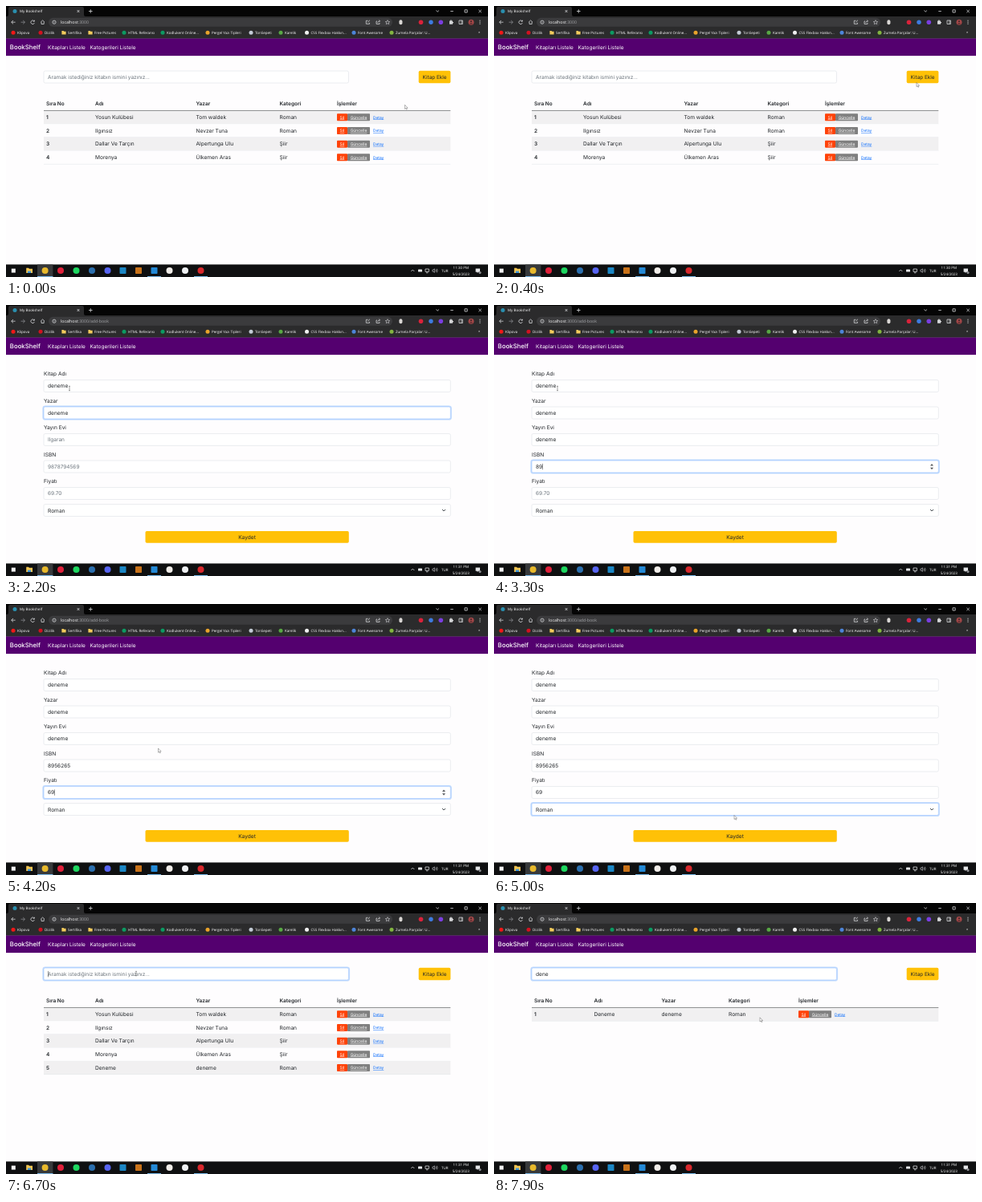
Write an HTML page that moves like this. It is 600 px wide and 338 px high and loops after 8 s.

```html
<!DOCTYPE html>
<html lang="tr">
<head>
<meta charset="utf-8">
<title>My Bookshelf</title>
<style>
  html, body { margin: 0; width: 100%; height: 100%; overflow: hidden; background: #fefdfe; }
  svg { display: block; width: 100%; height: 100%; }
  text { font: 6.6px Inter, "Open Sans", sans-serif; fill: #212529; text-rendering: geometricPrecision; white-space: pre; }
  .ui { font: 4.5px "Open Sans", "Noto Sans", sans-serif; fill: #fff; }
  .url { font-size: 5.2px; }
  .dim { fill: #a3a5a8; }
  .brand { font-size: 7.8px; fill: #fff; font-weight: 500; }
  .nav { font-size: 6.5px; fill: #fff; }
  .head { font-size: 6.5px; font-weight: 600; }
  .hint { font-size: 6.5px; fill: #6c757d; }
  .btn { font-size: 6.4px; }
  .tag, .link { text-decoration: underline; text-decoration-thickness: .3px; text-underline-offset: .6px; }
  .tag { font-size: 5px; fill: #fff; }
  .link { font-size: 4.85px; fill: #0d6efd; }
  .mid { text-anchor: middle; }
  .line { fill: none; stroke: #d5d6d8; stroke-width: .8; }
</style>
</head>
<body>
<svg viewBox="0 0 600 338" preserveAspectRatio="none">
  <g id="chrome"></g>
  <g id="page"></g>
  <g id="mouse"></g>
</svg>
<script>
const LOOP = 8000, STEP = 100;
const LIST_AGAIN = 5300, ROW_ADDED = 5500, FORM_OPEN = 600;
const FRAME = '#050505', TOOLBAR = '#2b2b2c', PILL = '#3b3b3d';

const rect = (x, y, w, h, fill, r = 0, more = '') =>
  `<rect x="${x}" y="${y}" width="${w}" height="${h}" fill="${fill}" rx="${r}" ${more}/>`;
const dot = (x, y, r, fill) => `<circle cx="${x}" cy="${y}" r="${r}" fill="${fill}"/>`;
const path = (d, more = 'class="line"') => `<path d="${d}" ${more}/>`;
// y is the middle of the line of text
const text = (x, y, s, cls = '', size = 6.5) =>
  `<text x="${x}" y="${y + size * .36}" class="${cls}">${s}</text>`;
const ui = (x, y, s, cls = '') => text(x, y, s, 'ui ' + cls, 4.5);

// ---- browser window and taskbar ----
const bookmarks = [
  [9, '#f01818', 'Klipova'], [43, '#d01220', 'Dizilik'],
  [72, 'folder', 'Sertifika'], [105, 'folder', 'Free Pictures'],
  [147, '#0c9a62', 'HTML Referansı'], [195, '#0c9a62', 'Kodlukent Online...'],
  [251, '#e9a32a', 'Pergel Yazı Tipleri'], [305, '#c3cbd6', 'TonSepeti'],
  [342, '#58a844', 'Karelik'], [374.5, '#f0f0f0', 'CSS Flexbox Hakkın...'],
  [433, '#4d84d8', 'Font Awesome'], [480, '#82b440', 'Zumela Parçalar: U...']
];

const taskIcons = [
  [68, '#e0203a'], [87.5, '#1ed760'], [107, '#2b6fae'], [126.5, '#5865f2'],
  [145.5, '#1b86c4', 1], [165, '#c9731a', 1], [184.5, '#2489d6', 1],
  [203.5, '#f0ece8'], [223, '#eef0f2'], [242.5, '#d8282c']
];

function windowFrame() {
  let s = rect(0, 0, 600, 40.5, FRAME);
  s += path('M1 13Q3 13 3 11V3Q3 1 5 1H95Q97 1 97 3V11Q97 13 99 13Z', `fill="${TOOLBAR}"`);
  s += rect(0, 13, 600, 27.5, TOOLBAR);
  s += dot(11, 6.5, 2.5, '#2a8fae') + ui(17, 6.5, 'My Bookshelf');
  s += path('M88.6 5L91.4 8M91.4 5L88.6 8M105.3 4.2V8.8M103 6.5H107.6');
  s += path('M535.5 5.5L537.3 7.2L539 5.5M553.3 6.5H556.8M571 4.8H574.2V8H571ZM588.4 4.8L591.8 8.2M591.8 4.8L588.4 8.2');

  s += path('M11.6 20.2H6.8M9 18L6.7 20.2L9 22.4');
  s += path('M18.6 20.2H23.4M21.2 18L23.5 20.2L21.2 22.4', 'class="line" style="stroke:#8a8b8e"');
  s += path('M35 18.8A2.3 2.3 0 1 0 35.4 21M35.4 17.6V19.2H33.7');
  s += path('M43.2 20.2L45.6 17.9L48 20.2M44 19.8V22.5H47.2V19.8');

  s += rect(53, 14.8, 428, 11, PILL, 5.5);
  s += `<circle cx="60" cy="20.2" r="2.1" class="line"/>` + path('M60 19.8V21.3M60 18.8V19.2', 'class="line" style="stroke-width:.6"');
  s += path('M450.5 18.3H448.3V22.3H452.5V20.8M450.2 20.4L453 17.7');
  s += path('M462 19H461V22.4H465V21M462.6 20.8Q463 18.9 465.4 18.8M464.3 17.7L465.5 18.8L464.3 19.9');
  s += path('M475 17.6L475.8 19.4L477.7 19.6L476.2 20.9L476.7 22.7L475 21.7L473.3 22.7L473.8 20.9L472.3 19.6L474.2 19.4Z', 'class="line" style="stroke-width:.6"');
  s += rect(489.4, 17.3, 4, 6, '#d9d6d4', 2);
  s += dot(516.5, 20.2, 2.8, '#d9223a') + dot(529, 20.2, 2.7, '#3d7be0') + dot(541.3, 20.2, 2.8, '#7a3ee0');
  s += path('M552 18.6H553.2V17.4H554.6V18.6H556V20H557V21.3H556V22.8H552Z', 'fill="#d5d6d8"');
  s += path('M564 18H568.4V22.5H564ZM567 18V22.5');
  s += dot(579, 20.2, 3.5, '#a34748') + dot(579, 19.2, 1.1, '#4b2a2c') + path('M576.8 22.6Q579 19.8 581.2 22.6Z', 'fill="#4b2a2c"');
  s += [18.2, 20.2, 22.2].map(y => dot(590, y, .6, '#d5d6d8')).join('');

  for (const [x, color, name] of bookmarks) {
    s += color === 'folder'
      ? path(`M${x - 2.6} 31H${x - .4}L${x + .3} 31.7H${x + 2.6}V35.4H${x - 2.6}Z`, 'fill="#f3cb5c"')
      : dot(x, 33.2, 2.5, color);
    s += ui(x + 5, 33.2, name);
  }
  s += ui(588, 32.8, '»');

  s += rect(0, 40.5, 600, 21.6, '#54006f');
  s += text(4.8, 51.2, 'BookShelf', 'brand', 7.8);
  s += text(52, 51.3, 'Kitapları Listele', 'nav') + text(104.5, 51.3, 'Katogerileri Listele', 'nav');

  s += rect(0, 322.4, 600, 15.6, '#0f1011');
  s += rect(6.8, 327.6, 5, 5, '#f4f4f4');
  s += path('M25.2 326.8H28L29 327.8H33V333H25.2Z', 'fill="#f2c552"') + rect(27, 330.6, 4.2, 2.4, '#3f95d8');
  s += rect(39, 322.4, 19.4, 15.6, '#37393b') + dot(48.6, 330, 4, '#e8b92c');
  for (const [x, color, square] of taskIcons)
    s += square ? rect(x - 4, 326, 8, 8, color, .8) : dot(x, 330, 4, color);
  for (const x of [39, 176, 234]) s += rect(x, 337, x === 39 ? 19.4 : 17, 1, '#79b8e6');

  s += path('M504.3 331L506.3 329L508.3 331');
  s += rect(513, 328.6, 5, 3, '#e4e5e7', .6) + path('M522 328H526.4V331.4H522ZM523 332.8H525.4');
  s += path('M531 329H532L533.4 327.8V332.4L532 331.2H531ZM535 328.6Q536 330 535 331.6M536.4 327.8Q537.8 330 536.4 332.4', 'class="line" style="stroke-width:.6"');
  s += ui(542, 330.2, 'TUR');
  s += `<text id="clock" class="ui mid" x="566.3" y="327.9"></text>`;
  s += `<text class="ui mid" x="566.3" y="335.6">5/24/2023</text>`;
  s += path('M584.6 327.4H590V331.8H588L586.6 333.2V331.8H584.6Z', 'fill="#e4e5e7"') + dot(590, 332.6, 1.6, '#8b8d90');
  return s;
}

// ---- page parts ----
function box(x, y, w, focused) {
  const glow = focused ? rect(x - .8, y - .8, w + 1.6, 16.6, 'none', 2.6, 'stroke="#c2dbfe" stroke-width="1.6"') : '';
  return glow + rect(x, y, w, 15, '#fff', 1.8, `stroke="${focused ? '#86b7fe' : '#d6dae0'}" stroke-width=".5"`);
}

function input(x, y, w, value, hint, focused) {
  return box(x, y, w, focused) +
    (value ? '' : text(x + 5, y + 7.6, hint, 'hint')) +
    `<text x="${x + 5}" y="${y + 9.9}" ${focused ? 'id="active"' : ''}>${value}</text>`;
}

const typed = (word, start, t) =>
  word.slice(0, Math.max(0, Math.floor((t - start) / STEP) + 1));

const books = [
  ['Yosun Kulübesi', 'Tom waldek', 'Roman'],
  ['Ilgınsız', 'Nevzer Tuna', 'Roman'],
  ['Dallar Ve Tarçın', 'Alpertunga Ulu', 'Şiir'],
  ['Morenya', 'Ülkemen Aras', 'Şiir'],
  ['Deneme', 'deneme', 'Roman']
];
const titles = ['Sıra No', 'Adı', 'Yazar', 'Kategori', 'İşlemler'];
const wideCols = [50, 111, 236.5, 340.5, 412];
const evenCols = [50, 124.5, 208.5, 292, 379];
const search = { x: 47, y: 81, w: 379.5, focus: 6400, start: 7300, word: 'dene' };

function listPage(t) {
  const query = typed(search.word, search.start, t);
  const known = t >= ROW_ADDED ? books : books.slice(0, 4);
  const rows = known.filter(b => b[0].toLowerCase().startsWith(query));
  const cols = rows.length === 1 ? evenCols : wideCols;
  const actions = cols[4];

  let s = input(search.x, search.y, search.w, query, 'Aramak istediğiniz kitabın ismini yazınız...', t >= search.focus);
  s += rect(513.7, 80.8, 39.7, 15.4, '#ffc107', 1.8) + text(533.6, 88.6, 'Kitap Ekle', 'btn mid');
  titles.forEach((h, i) => s += text(cols[i], 122, h, 'head'));

  rows.forEach((book, i) => {
    const y = 130.5 + i * 16.67, mid = y + 8;
    s += rect(47, y, 506.3, 16.67, i % 2 ? '#fefdfe' : '#f1f0f1');
    s += rect(47, y + 16.4, 506.3, .5, '#dee2e6');
    s += text(cols[0], mid, i + 1, 'head');
    book.forEach((cell, c) => s += text(cols[c + 1], mid, cell));
    s += rect(actions, mid - 4.2, 13, 9, '#ff4208', .8) + rect(actions + 13, mid - 4.2, 28, 9, '#7f7f7f', .8);
    s += text(actions + 6.4, mid + .2, 'Sil', 'tag mid', 5);
    s += text(actions + 27, mid + .2, 'Güncelle', 'tag mid', 5);
    s += text(actions + 45, mid + .2, 'Detay', 'link', 5);
  });
  return s + rect(47, 130.3, 506.3, .6, '#4a4d50');
}

const fields = [
  { label: 'Kitap Adı', hint: 'Dallar', word: 'deneme', focus: 900, start: 1000 },
  { label: 'Yazar', hint: 'Nevzer Tuna', word: 'deneme', focus: 1600, start: 1700 },
  { label: 'Yayın Evi', hint: 'Ilgaran', word: 'deneme', focus: 2300, start: 2400 },
  { label: 'ISBN', hint: '9878794569', word: '8956265', focus: 3000, start: 3200, number: true },
  { label: 'Fiyatı', hint: '69.70', word: '69', focus: 4000, start: 4100, number: true }
];
fields.forEach((f, i) => f.y = 93.5 + i * 33.5);
const SELECT_FOCUS = 4500;

function formPage(t) {
  let s = '';
  fields.forEach((f, i) => {
    const end = i < 4 ? fields[i + 1].focus : SELECT_FOCUS;
    const focused = t >= f.focus && t < end;
    s += text(47, f.y - 7.7, f.label);
    s += input(47, f.y, 506.3, typed(f.word, f.start, t), f.hint, focused);
    if (focused && f.number)
      s += path(`M543 ${f.y + 6.4}L545 ${f.y + 4}L547 ${f.y + 6.4}ZM543 ${f.y + 8.8}L545 ${f.y + 11.2}L547 ${f.y + 8.8}Z`, 'fill="#55585b"');
  });
  s += box(47, 248.5, 506.3, t >= SELECT_FOCUS) + text(52, 256.2, 'Roman');
  s += path('M543 255L545 257L547 255', 'fill="none" stroke="#343a40" stroke-width=".9"');
  s += rect(173.5, 282, 253.3, 14.8, '#ffc107', 1.8) + text(300, 289.5, 'Kaydet', 'mid');
  return s;
}

// ---- mouse ----
const track = [
  [0, 496.5, 123.3], [200, 503, 114], [500, 534, 89], [600, 534, 89], [900, 79, 104],
  [3900, 79, 104], [4500, 300, 256], [5000, 299, 263.4], [5200, 300, 289], [5300, 300, 289],
  [5500, 262, 196], [6000, 162, 86], [6400, 162, 88], [7300, 162, 88], [7800, 331, 142.8], [8000, 331, 142.8]
];

function mouseAt(t) {
  const i = track.findIndex(p => p[0] > t);
  const [t0, x0, y0] = track[i - 1], [t1, x1, y1] = track[i];
  const k = (t - t0) / (t1 - t0), e = k * k * (3 - 2 * k);
  return [x0 + (x1 - x0) * e, y0 + (y1 - y0) * e];
}

function mouseShape(t, onForm) {
  const [x, y] = mouseAt(t);
  const spots = onForm ? fields.map(f => ({ x: 47, y: f.y, w: 506 })) : [search];
  const beam = spots.some(b => x > b.x && x < b.x + b.w && y > b.y && y < b.y + 15);
  const d = beam
    ? path('M-1 -2.7H1M0 -2.7V2.7M-1 2.7H1', 'fill="none" stroke="#444" stroke-width=".5"')
    : path('M0 0V5.2L1.2 4.1L2 5.9L2.8 5.5L2 3.8H3.6Z', 'fill="#fff" stroke="#444" stroke-width=".4"');
  return `<g transform="translate(${x} ${y})">${d}</g>`;
}

// ---- playback ----
const $ = id => document.getElementById(id);
const focusTimes = [...fields.map(f => f.focus), search.focus];

function drawCaret(t) {
  const active = $('active');
  if (!active) return;
  const since = t - Math.max(...focusTimes.filter(f => f <= t));
  if (since % 1000 >= 500) return;
  const x = +active.getAttribute('x') + active.getComputedTextLength() + .3;
  const y = +active.getAttribute('y') - 6;
  $('page').insertAdjacentHTML('beforeend', rect(x, y, .5, 7.4, '#212529'));
}

function draw(t) {
  const onForm = t >= FORM_OPEN && t < LIST_AGAIN;
  $('page').innerHTML = onForm ? formPage(t) : listPage(t);
  drawCaret(t);
  $('mouse').innerHTML = mouseShape(t, onForm);
  $('url').textContent = onForm ? ':3000/add-book' : ':3000';
  $('clock').textContent = t < 1000 ? '11:30 PM' : '11:31 PM';
}

$('chrome').innerHTML = windowFrame() +
  `<text class="ui url" x="68" y="22.1">localhost<tspan id="url" class="dim"></tspan></text>`;

let shown = -1;
const begin = performance.now();
function tick() {
  const t = Math.floor((performance.now() - begin) % LOOP / STEP) * STEP;
  if (t !== shown) draw(shown = t);
  requestAnimationFrame(tick);
}
tick();
</script>
</body>
</html>
```
